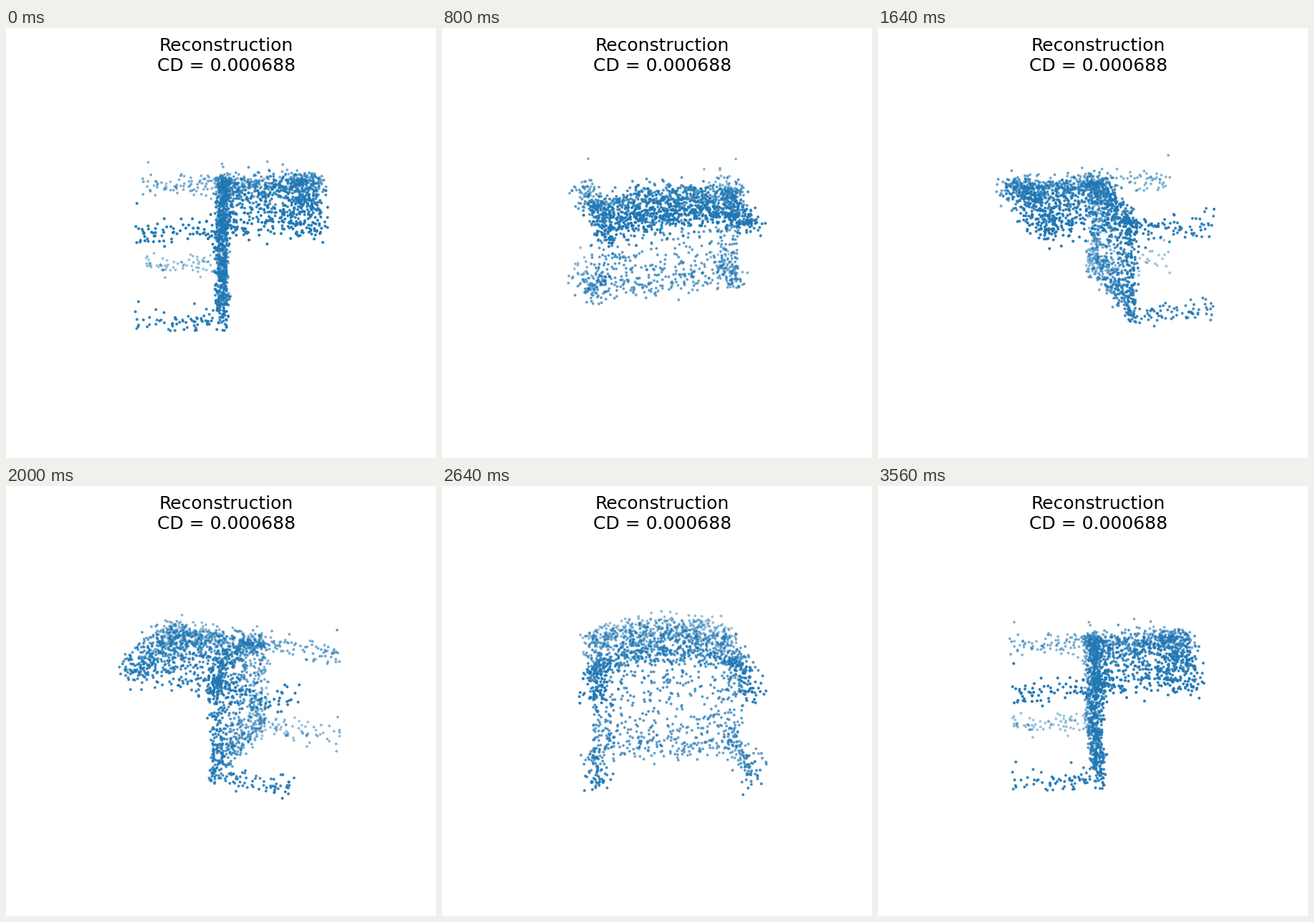
Recreate the animation shown at these times as a matplotlib script. Size 600 by 600 pixels, loop 3600 ms.

```python
import numpy as np
import matplotlib.pyplot as plt
from matplotlib.animation import FuncAnimation
from matplotlib.colors import to_rgb

FRAMES, INTERVAL = 90, 40
SIZE = 600
ELEV = np.radians(20)
DIST = 10                      # camera distance in world units
FOCAL = 2497                   # pixels per unit of x / depth
CENTER = np.array([313.7, 296.8])
BLUE = to_rgb("#1f77b4")

rng = np.random.default_rng(7)


def noise(n, sigma):
    """Gaussian jitter with a few wider strays."""
    wide = np.where(rng.random(n) < 0.06, 1.8, 1.0)
    return rng.normal(0, sigma, n) * wide


def back_z(x, y):
    """Depth of the curved, slightly tilted backrest."""
    return 0.198 + 0.08 * (1 - (x / 0.43) ** 2) + 0.04 * y


def backrest(n, y):
    x = rng.uniform(-0.43, 0.43, n)
    return np.column_stack([x + noise(n, 0.015), y + noise(n, 0.016),
                            back_z(x, y) + noise(n, 0.032)])


def seat(n):
    x = rng.uniform(-0.42, 0.42, n)
    edge = rng.random(n) < 0.22
    x[edge] = np.sign(x[edge]) * rng.uniform(0.31, 0.42, edge.sum())
    front = -0.335 + 0.03 * (x / 0.43) ** 2
    t = rng.random(n)
    rim = rng.random(n) < 0.22
    t[rim] *= 0.28
    z = front + (0.24 - front) * t
    y = -0.05 + rng.uniform(-0.028, 0.028, n)
    return np.column_stack([x, y + noise(n, 0.009), z + noise(n, 0.02)])


def leg(n, x, z):
    """Points thin out slightly from the seat towards the foot."""
    y = -0.02 - 0.5 * rng.random(n) ** 1.2
    return np.column_stack([x + noise(n, 0.034), y, z + noise(n, 0.032)])


def make_chair():
    parts = [
        backrest(720, rng.uniform(-0.05, 0.5, 720)),
        backrest(200, rng.normal(0.4, 0.055, 200)),
        backrest(200, rng.uniform(-0.07, 0.0, 200)),
        seat(600),
    ]
    for side in (-1, 1):
        parts.append(leg(88, side * 0.405, 0.195))
        parts.append(leg(78, side * 0.42, -0.302))
    return np.vstack(parts)


def project(points, azim):
    """Pixel positions and depths seen from the given azimuth."""
    ca, sa = np.cos(azim), np.sin(azim)
    ce, se = np.cos(ELEV), np.sin(ELEV)
    right = np.array([-sa, ca, 0])
    up = np.array([-se * ca, -se * sa, ce])
    toward = np.array([ce * ca, ce * sa, se])
    depth = DIST - points @ toward
    scale = FOCAL / depth
    xy = np.column_stack([points @ right * scale, -(points @ up) * scale])
    return CENTER + xy, depth


chair = make_chair()

fig = plt.figure(figsize=(6, 6), dpi=100, facecolor="white")
ax = fig.add_axes([0, 0, 1, 1])
ax.set(xlim=(0, SIZE), ylim=(SIZE, 0))
ax.axis("off")
fig.text(307.5 / SIZE, 1 - 13 / SIZE, "Reconstruction\nCD = 0.000688",
         fontsize=18, family="DejaVu Sans", ha="center", va="top")
dots = ax.scatter(chair[:, 0], chair[:, 1], s=2, color=[BLUE],
                  linewidths=1.5, edgecolors="face")


def update(i):
    xy, depth = project(chair, 2 * np.pi * i / FRAMES)
    order = np.argsort(-depth)
    near = -1 / depth[order]
    shade = (near - near.min()) / (near.max() - near.min())
    rgba = np.empty((len(chair), 4))
    rgba[:, :3] = BLUE
    rgba[:, 3] = 1 - 0.7 * shade
    dots.set_offsets(xy[order])
    dots.set_facecolor(rgba)
    dots.set_edgecolor(rgba)
    return (dots,)


anim = FuncAnimation(fig, update, frames=FRAMES, interval=INTERVAL,
                     repeat=True, repeat_delay=0)
plt.show()
```
